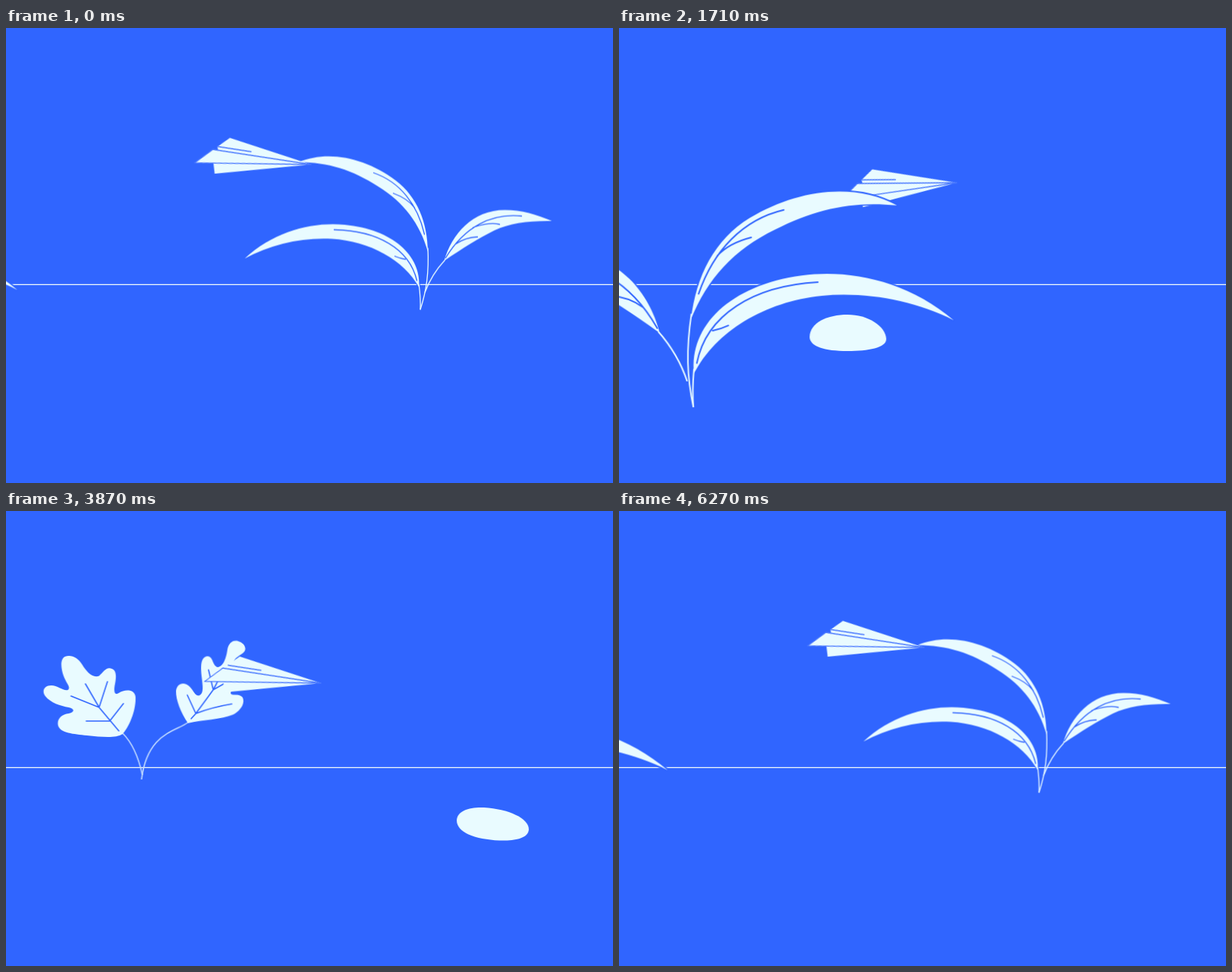
An HTML page that plays this animation: 800 by 600 pixels, repeating every 6.3 s.

```html
<!DOCTYPE html>
<html lang="en">
<head>
<meta charset="utf-8">
<title>Paper plane</title>
<style>
@property --k { syntax: '<number>'; inherits: true; initial-value: 0; }
:root { --sky: #3065ff; --pale: #e9fbff; }
html, body { margin: 0; width: 100%; height: 100%; overflow: hidden; background: var(--sky); }
svg { display: block; width: 100vw; height: 100vh; }

.line { fill: none; stroke: var(--pale); stroke-width: 1.3; }
.vein { fill: none; stroke: var(--sky); stroke-width: 1.3; stroke-linecap: round; }
.leaf { fill: var(--pale); stroke: var(--sky); stroke-width: 2.4; paint-order: stroke; }
.stone { fill: var(--pale); }
.grass { fill: var(--sky); stroke: var(--pale); stroke-width: 1.3; stroke-linejoin: round; }
#plane path { fill: var(--pale); }
#plane .fold { stroke: #4a79ff; stroke-width: 1.3; stroke-linejoin: round; }
#plane .crease { fill: none; stroke: #4a79ff; stroke-width: 1.6; }
.oak .leaf { stroke: none; }
.oak .line { stroke: #c3dcff; stroke-width: 1.6; }
.oak .vein { stroke-width: 1.6; }

/* each item crosses the stage at its own constant speed */
.drift { animation: drift 6.3s linear infinite; }
@keyframes drift {
  from { transform: translate(var(--x0), var(--y0, 0px)); }
  to { transform: translate(var(--x1), var(--y1, var(--y0, 0px))); }
}

/* --k bends the leaves: 0 is rest, 1 is fully bent */
.top, .low, .side { transform-origin: 546.5px 371.5px; }
.top { transform: rotate(calc(var(--k) * -5.8deg)); }
.low { transform: rotate(calc(var(--k) * 2.2deg)); }
.side { transform: rotate(calc(var(--k) * -1.5deg)); }
.bent { --k: 1; }
.settle { animation: settle 6.3s ease-in-out infinite; }
@keyframes settle { 0%, 88.57% { --k: .9; } 99.5%, 100% { --k: 0; } }
.nod { transform-origin: 582.5px 353px; animation: nod 6.3s ease-in-out infinite; }
@keyframes nod {
  0%, 46.2% { transform: rotate(0deg); }
  61.4%, 100% { transform: rotate(1.7deg); }
}
</style>
</head>
<body>
<svg viewBox="0 0 800 600" preserveAspectRatio="none">
  <defs>
    <g id="plant">
      <g transform="translate(-546.5 -371.5)">
        <g class="side">
          <path class="leaf" d="M578 307C588 272 615 240 658 240C680 240 700 246 720 254.5C690 254 665 257 644 267C622 278 603 290 578 307Z"/>
          <path class="line" d="M579 306C566 320 558 334 552.5 349"/>
          <path class="vein" d="M680 248C640 244 605 262 580 303M651 259C640 256 628 259 616 263M622 275.5Q606 276 593 285"/>
        </g>
        <g class="top">
          <path class="leaf" d="M386.5 177C425 160.5 475 171.5 514 201C543 223 556 257 556.5 295C546 258 525 230 491 209C457 187 425 177 386.5 177Z"/>
          <path class="line" d="M556.5 290C558 322 555 345 546.5 371.5"/>
          <path class="vein" d="M485 191C520 203 543 233 552 272M511 218Q530 225 539 237"/>
        </g>
        <g class="low">
          <path class="leaf" d="M315 304C355 267.3 405 255.5 447 259.5C510 265.5 548 300 545 342C525 306 480 281 430 278C390 276 350 285 315 304Z"/>
          <path class="line" d="M544.7 338C546.5 352 547 362 546.5 371.5"/>
          <path class="vein" d="M433 266C490 267 532 291 542 333M513 301Q520 304 527 305"/>
        </g>
      </g>
    </g>
    <g id="tall" class="bent"><use href="#plant" transform="scale(-1.5 1.5)"/></g>
  </defs>

  <path class="line" d="M0 338.3H800" style="stroke:#f2fbfa"/>

  <g class="drift" style="--x0:546.5px;--x1:-2654px;--y0:371.5px"><use href="#plant"/></g>
  <g class="drift" style="--x0:3758px;--x1:538.7px;--y0:371.5px"><g class="settle"><use href="#plant"/></g></g>

  <g class="drift oak" style="--x0:1221.6px;--x1:-1423px">
    <path class="line" d="M557 293C570 306 578 325 583 348"/>
    <path class="leaf" d="M557 294C566 284 575 262 574 245C573 234 559 235 552 240C546 244 545 237 547 228C549 217 549 209 541 207.5C535 206 531 213 526 217.5C517 221 509 211 504 203C498 193 489 189 481 192C474 196 476 208 479 217C483 228 489 232 485 236C479 238 472 230 463 230C454 230 450 237 455 244C462 253 475 257 486 259C494 261 494 265 486 267C476 268 470 275 472 283C475 293 492 294 510 296C530 298 548 300 557 294Z"/>
    <path class="vein" d="M508 228L526 259L552 290M489 244L526 259L537 225M509 277H540L558 254"/>
    <g class="nod">
      <path class="line" d="M641 277C625 290 588 292 582 354"/>
      <path class="leaf" d="M641 278C631 264 624 248 624 236C625 225 635 223 642 230C648 236 650 243 655 241C661 238 659 228 657 215C655 200 656 190 664 189C672 189 671 202 678 203C686 202 689 189 690 180C691 171 697 166 704 168C712 170 716 177 712 182C708 187 699 189 699 197C700 206 708 202 715 202C723 203 724 211 719 216C712 223 697 228 696 237C698 241 707 236 712 242C716 250 709 260 700 265C685 272 660 273 641 278Z"/>
      <path class="vein" d="M645 272L651 265L673 233Q681 218 684 205M639 241L651 265Q672 256 698 251M666 207L673 233L703 215"/>
    </g>
  </g>

  <path class="drift grass" style="--x0:3463px;--x1:-4034px" d="M529.5 413C533 392 519 371 495 369.5C514 363 533 372 538 391C540 370 552 352 572 346.5C560 352 551 372 553 390C566 374 588 371 610 380.5C580 379 565 387 556 414"/>
  <path class="drift grass" style="--x0:2734px;--x1:-353px;--y0:.6px" d="M110 377.5C110 354 80 344 52 337C72 330 100 330 112 346C115 331 100 322 80 315C102 310 120 323 125 342C128 322 140 307 160 306C147 308 138 330 141 349C150 332 172 330 198 341C168 339 150 345 139 378"/>

  <path class="drift stone" style="--x0:304.7px;--x1:-2473.3px" d="M701 408C701 388 725 378 751 378C778 378 801 393 802 410C802 422 778 426 751 426C720 426 702 420 701 408Z"/>
  <path class="drift stone" style="--x0:1283px;--x1:-1495px" d="M315 451C315 440 338 446 352 436C368 427 387 430 388 447C388 463 372 470 352 470C330 470 315 462 315 451Z"/>
  <path class="drift stone" style="--x0:1707px;--x1:-1071px" d="M594 408C594 395 612 390 630 391C662 393 689 405 689 420C688 433 667 435 650 434.5C618 433 594 424 594 408Z"/>

  <g id="plane">
    <path d="M0 0L-127.5 -17V-3Z"/>
    <path d="M0 0L-102 -47.5L-119.5 -38V-33Z"/>
    <path class="crease" d="M-119 -38L-76 -26"/>
    <path class="fold" d="M0 0L-126 -35L-152 -20.3Z"/>
  </g>

  <g class="drift" style="--x0:1963px;--x1:-4904px;--y0:482px;--y1:548px"><use href="#tall"/></g>
  <g class="drift" style="--x0:6557.5px;--x1:-310.5px;--y0:390.4px;--y1:456.6px"><use href="#tall"/></g>
  <g class="drift" style="--x0:-327px;--x1:-7194px;--y0:460px"><use href="#tall"/></g>
</svg>
<script>
const LOOP = 6300;
// time, nose x, nose y, tilt in degrees
const path = [
  [0, 402, 180, -6.8],
  [690, 418, 243, 1.4],
  [1200, 435, 229, -12],
  [1710, 445, 204, -16],
  [2040, 436, 201, -8],
  [2910, 400, 224, 0],
  [3400, 404, 234, -2],
  [3870, 415, 227, -6.8],
  [4700, 428, 219, -13],
  [5280, 433, 197, -15.5],
  [5580, 430, 189, -15],
  [5940, 415, 180, -11],
  [6270, 402, 180, -6.8],
  [6300, 402, 180, -6.8]
];
const plane = document.getElementById('plane');

function slope(i, c) {
  const a = path[i - 1], b = path[i + 1];
  if (!a || !b || i === path.length - 2) return 0;
  return (b[c] - a[c]) / (b[0] - a[0]);
}

// cubic Hermite through the points of the path
function at(t, c) {
  const i = path.findIndex((p, n) => n && t <= p[0]) - 1;
  const a = path[i], b = path[i + 1], h = b[0] - a[0];
  const u = (t - a[0]) / h, v = 1 - u;
  return v * v * (1 + 2 * u) * a[c] + u * u * (3 - 2 * u) * b[c]
    + h * u * v * (v * slope(i, c) - u * slope(i + 1, c));
}

let start;
function draw(now) {
  start ??= now;
  const t = Math.max(0, now - start) % LOOP;
  plane.setAttribute('transform', `translate(${at(t, 1)} ${at(t, 2)}) rotate(${at(t, 3)})`);
  requestAnimationFrame(draw);
}
requestAnimationFrame(draw);
</script>
</body>
</html>
```
